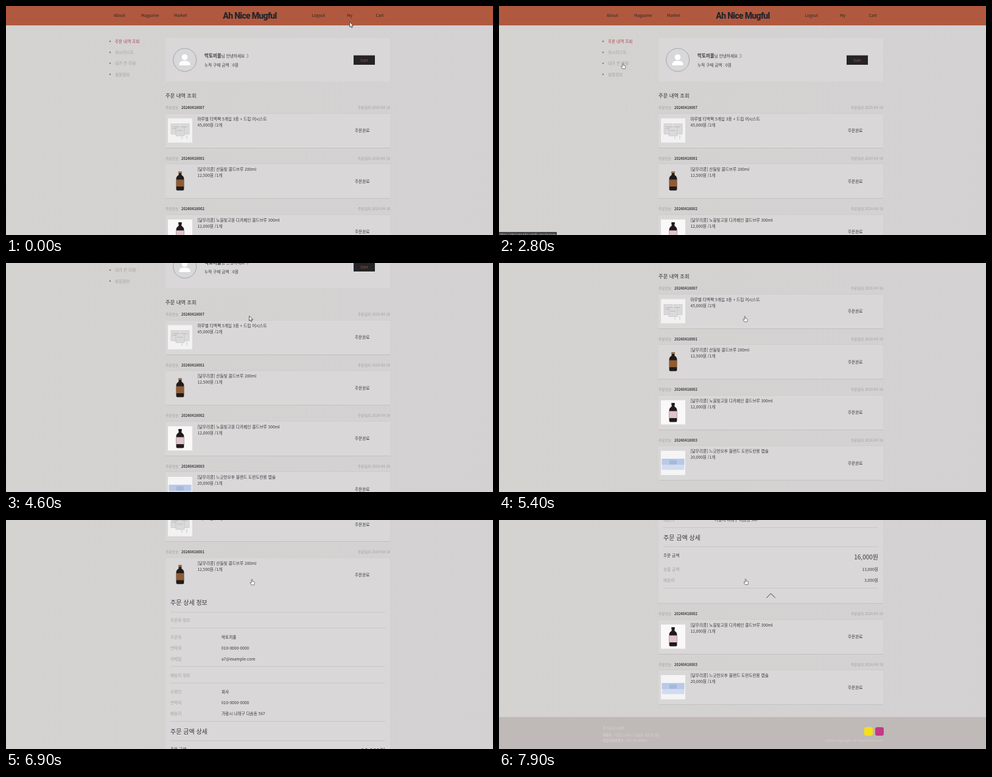
An HTML page that plays this animation: 800x378 px, repeating every 8000 ms.

```html
<!DOCTYPE html>
<html lang="ko">
<head>
<meta charset="utf-8">
<title>Order history</title>
<style>
  html, body { margin: 0; width: 100%; height: 100%; overflow: hidden; }
  body { background: linear-gradient(100deg, #d4d3d0, #d4d2d1 45%, #d4d1d3); }
  svg { display: block; width: 800px; height: 378px; }
  text { font-family: "Noto Sans CJK KR", "Noto Sans CJK JP", "Noto Sans CJK", sans-serif; }
  .logo { font-family: Roboto, sans-serif; letter-spacing: -.7px; }
</style>
</head>
<body>
<svg id="stage" viewBox="0 0 800 378">
  <g id="page">
    <g id="top"></g>
    <g id="detail"></g>
    <g id="tail"></g>
  </g>
  <g id="status"></g>
  <path id="arrow" d="M0 0V8.2L1.9 6.5L3.2 9.4L4.6 8.8L3.4 6H6Z" fill="#fff" stroke="#33333a" stroke-width=".8"/>
  <path id="hand" d="M-.8 .8Q0-.4 .8 .8V4L3.8 4.7Q4.6 5 4.4 6L3.7 9.6H-.9L-3 6.2Q-3 5-1.9 5.3L-.8 6.3Z" fill="#fff" stroke="#44444a" stroke-width=".7"/>
</svg>
<script>
const LOOP = 8000, OPEN_AT = 6400, GROWTH = 339, ROW = 83.5;
const INK = '#38383c', PALE = '#a3a0a0', PANEL = '#d9d7d7', LINE = '#b6b3b4';
const $ = id => document.getElementById(id);
const add = (parent, html) => parent.insertAdjacentHTML('beforeend', html);

// Text is placed by its vertical centre.
const text = (parent, x, y, content, { size = 6.67, fill = INK, weight = 400, anchor = 'start', cls = '' } = {}) =>
  add(parent, `<text class="${cls}" x="${x}" y="${y + size * .42}" font-size="${size}" fill="${fill}" font-weight="${weight}" text-anchor="${anchor}">${content}</text>`);
const box = (parent, x, y, w, h, fill, extra = '') =>
  add(parent, `<rect x="${x}" y="${y}" width="${w}" height="${h}" fill="${fill}" ${extra}/>`);
const path = (parent, d, fill, extra = '') => add(parent, `<path d="${d}" fill="${fill}" ${extra}/>`);

const top_ = $('top'), detail = $('detail'), tail = $('tail'), status = $('status');

function drawHeader() {
  box(top_, 0, 0, 800, 32, '#b0593f');
  [['About', 177], ['Magazine', 222], ['Market', 276], ['Logout', 502.5], ['My', 560], ['Cart', 607.5]]
    .forEach(([label, x]) => text(top_, x, 15.5, label, { fill: '#2b2424' }));
  text(top_, 400.5, 15, 'Ah Nice Mugful', { size: 14, weight: 900, fill: '#25262b', anchor: 'middle', cls: 'logo' });
}

function drawProfile() {
  ['주문 내역 조회', '위시리스트', '내가 쓴 리뷰', '회원정보'].forEach((label, i) => {
    const y = 58.2 + i * 18.2;
    add(top_, `<circle cx="171" cy="${y}" r="1.2" fill="#77758a"/>`);
    text(top_, 179, y, label, { fill: i ? PALE : '#b0434a' });
  });
  box(top_, 262, 53, 369, 71.5, PANEL);
  add(top_, '<circle cx="293.7" cy="89" r="19" fill="#d8d8da" stroke="#8f8f95" stroke-width=".7"/><circle cx="293.5" cy="84.5" r="4.8" fill="#fff"/>');
  path(top_, 'M284.5 98V95.5Q285 90.5 293.5 90.5T302.5 95.5V98Z', '#fff');
  text(top_, 326, 82.5, '<tspan font-size="7.5" font-weight="700">박토끼풀</tspan>님 안녕하세요 :)');
  text(top_, 326, 97, '누적 구매 금액 : 0원');
  box(top_, 571, 81.5, 35, 15.5, '#242427');
  text(top_, 588.5, 89.3, 'User', { size: 5.83, fill: '#b4523c', anchor: 'middle' });
  text(top_, 262, 148, '주문 내역 조회', { size: 8.33, weight: 500, fill: '#2c2c30' });
}

function drawBottle(parent, y, cap, label) {
  path(parent, `M283.6 ${y}H288.4V${y + 6}Q292.4 ${y + 8.5} 292.4 ${y + 12}V${y + 29.5}Q292.4 ${y + 31.5} 290.4 ${y + 31.5}H281.6Q279.6 ${y + 31.5} 279.6 ${y + 29.5}V${y + 12}Q279.6 ${y + 8.5} 283.6 ${y + 6}Z`, '#211a1b');
  box(parent, 283.4, y, 5.2, 3, cap);
  box(parent, 279.9, y + 13.5, 12.2, 11.5, label);
}

const pictures = [
  (g, y) => {
    box(g, 266, y, 40, 40, '#f3f2f2');
    [[271, 9, 14, 17], [287, 9, 14, 17], [279, 14, 14, 15]].forEach(([x, dy, w, h]) =>
      box(g, x, y + dy, w, h, '#dadadb', 'stroke="#b9b9bb" stroke-width=".5"'));
    path(g, `M273 ${y + 14}H283M273 ${y + 17}H280M289 ${y + 14}H298M281 ${y + 20}H290M289 ${y + 30}V${y + 34}M297 ${y + 28}V${y + 34}`, 'none', 'stroke="#a5a5a8" stroke-width=".6"');
  },
  (g, y) => drawBottle(g, y + 4, '#9a7443', '#8f5c33'),
  (g, y) => {
    box(g, 266, y, 40, 40, '#faf8f8');
    drawBottle(g, y + 4.5, '#211a1b', '#e0c3cd');
  },
  (g, y) => {
    box(g, 266, y, 40, 40, '#f5f5f6');
    box(g, 267.5, y + 13, 37, 18.5, '#d3dcee');
    box(g, 267.5, y + 13, 37, 10, '#b9c9e6');
    box(g, 280, y + 15.5, 12, 7, '#a5b9dd');
  }
];

const orders = [
  ['20240418007', '마루별 티백팩 5개입 3종 + 드립 어시스트', '45,000원 /2개'],
  ['20240418001', '[달무리콩] 산들빛 콜드브루 200ml', '12,500원 /1개'],
  ['20240418002', '[달무리콩] 노을빛고원 디카페인 콜드브루 300ml', '12,000원 /1개'],
  ['20240418003', '[달무리콩] 느긋한오후 블렌드 도란도란용 캡슐', '20,000원 /1개']
];

function drawOrder([number, name, price], i) {
  const g = i < 2 ? top_ : tail, y = 168 + i * ROW, small = { size: 5.83, fill: PALE };
  text(g, 262, y, '주문번호', small);
  text(g, 288, y, number, { size: 5.83, weight: 700 });
  text(g, 631, y, '주문일자 2024-04-18', { ...small, anchor: 'end' });
  box(g, 262, y + 9, 369, 57.5, PANEL, `id="card${i}"`);
  box(g, 262, y + 9, 369, .5, '#c3c0c1');
  box(g, 262, y + 66, 369, .6, '#b5b2b3', `id="edge${i}"`);
  pictures[i](g, y + 17.5);
  text(g, 314.5, y + 18, name);
  text(g, 314.5, y + 28, price);
  text(g, 573, y + 37.5, '주문완료');
}

function drawDetail() {
  const rule = y => box(detail, 270, y, 353, .5, LINE);
  const row = (y, label, value = '') => {
    text(detail, 270, y, label, { fill: PALE });
    text(detail, 354, y, value);
  };
  const cost = (y, label, value, opts = {}) => {
    text(detail, 270, y, label, { fill: opts.fill || PALE });
    text(detail, 623, y + (opts.dy || 0), value, { size: opts.size, anchor: 'end' });
  };
  detail.setAttribute('transform', 'translate(0 381.5)');
  text(detail, 270, -47, '주문 상세 정보', { size: 10 });
  [-31, -4.5, 58.7, 86, 149.5, 181.3, 249.5].forEach(rule);
  row(-18, '주문자 정보');
  row(10, '주문자', '박토끼풀');
  row(28.2, '연락처', '010-0000-0000');
  row(46.4, '이메일', 'a7@example.com');
  row(73, '배송지 정보');
  row(100.3, '수령인', '회사');
  row(118.5, '연락처', '010-0000-0000');
  row(136.5, '배송지', '가람시 나래구 다솜동 567');
  text(detail, 270, 166, '주문 금액 상세', { size: 10 });
  cost(195.5, '주문 금액', '16,000원', { fill: INK, size: 10, dy: 2.5 });
  cost(218.3, '상품 금액', '13,000원');
  cost(236.5, '배송비', '3,000원');
  path(detail, 'M439.5 266L446.6 258.8L453.7 266', 'none', 'stroke="#3a3a3e" stroke-width="1"');
}

function drawFooter() {
  const light = { size: 5.4, fill: '#d6d0ce' };
  box(tail, 0, 505.3, 800, 53, '#bfb9b7');
  text(tail, 170, 524, '주식회사 ANM.', { ...light, size: 5.83 });
  text(tail, 170, 535.2, '<tspan fill="#e2dcda">대표자</tspan> : 가람도 나래시 다솜로 라온길 3층', light);
  text(tail, 170, 543.6, '<tspan fill="#e2dcda">사업자등록번호</tspan> : 000-00-00000', light);
  text(tail, 631, 543.6, '©2024 Copyright. All Rights Reserved.', { ...light, anchor: 'end' });
  box(tail, 600, 522, 14, 14, '#f5df1c', 'rx="3"');
  box(tail, 618, 522, 14, 14, '#c23a86', 'rx="3"');
}

function drawStatus() {
  box(status, 0, 373, 95, 5, '#444447');
  text(status, 1, 377, 'https://ahnicemugful.netlify.app/mypage', { size: 4.8, fill: '#c9c9cb' });
}

drawHeader();
drawProfile();
orders.forEach(drawOrder);
drawDetail();
drawFooter();
drawStatus();

// Each key is [time, ...values], joined by straight segments.
const scrollKeys = [[4000, 0], [4600, 83], [4950, 83], [5300, 126], [5500, 126], [5800, 180],
  [6850, 180], [7400, 381.5], [7700, 519]];
const cursorKeys = [[1500, 564.5, 26.5], [1600, 547, 31], [1900, 420, 42], [2400, 214, 58], [2800, 203, 94],
  [3150, 203, 94], [3600, 290, 96], [4000, 391.7, 87], [4900, 403.5, 87.5], [5500, 403.5, 87.5],
  [5800, 400, 99.5], [6100, 400, 99.5], [6400, 403.5, 97.5], [7400, 403.5, 97.5], [7900, 404.7, 97]];

function at(keys, t) {
  const i = keys.findIndex(k => k[0] >= t);
  if (i < 0) return keys[keys.length - 1].slice(1);
  if (i === 0) return keys[0].slice(1);
  const a = keys[i - 1], b = keys[i], p = (t - a[0]) / (b[0] - a[0]);
  return a.slice(1).map((v, j) => v + (b[j + 1] - v) * p);
}

const show = (el, on) => el.setAttribute('visibility', on ? 'visible' : 'hidden');
const move = (el, x, y) => el.setAttribute('transform', `translate(${x} ${y})`);

function isClickable(x, y, growth) {
  if (x > 179 && x < 222 && y > 52 && y < 118) return true;
  return x > 262 && x < 631 && orders.some((_, i) => {
    const start = 177 + i * ROW + (i > 1 ? growth : 0);
    return y > start && y < start + 57.5 + (i === 1 ? growth : 0);
  });
}

function render(t) {
  const [scroll] = at(scrollKeys, t), [x, y] = at(cursorKeys, t);
  const growth = t >= OPEN_AT ? GROWTH : 0;
  const pointing = isClickable(x, y + scroll, growth);
  move($('page'), 0, -scroll);
  move(tail, 0, growth);
  move($('edge1'), 0, growth);
  $('card1').setAttribute('height', 57.5 + growth);
  show(detail, growth);
  show(status, (t >= 1600 && t < 1900) || (t >= 2400 && t < 3400));
  show($('arrow'), !pointing);
  show($('hand'), pointing);
  move($('arrow'), x, y);
  move($('hand'), x + .5, y);
}

const begin = performance.now();
function tick() {
  render((performance.now() - begin) % LOOP);
  requestAnimationFrame(tick);
}
tick();
</script>
</body>
</html>
```
